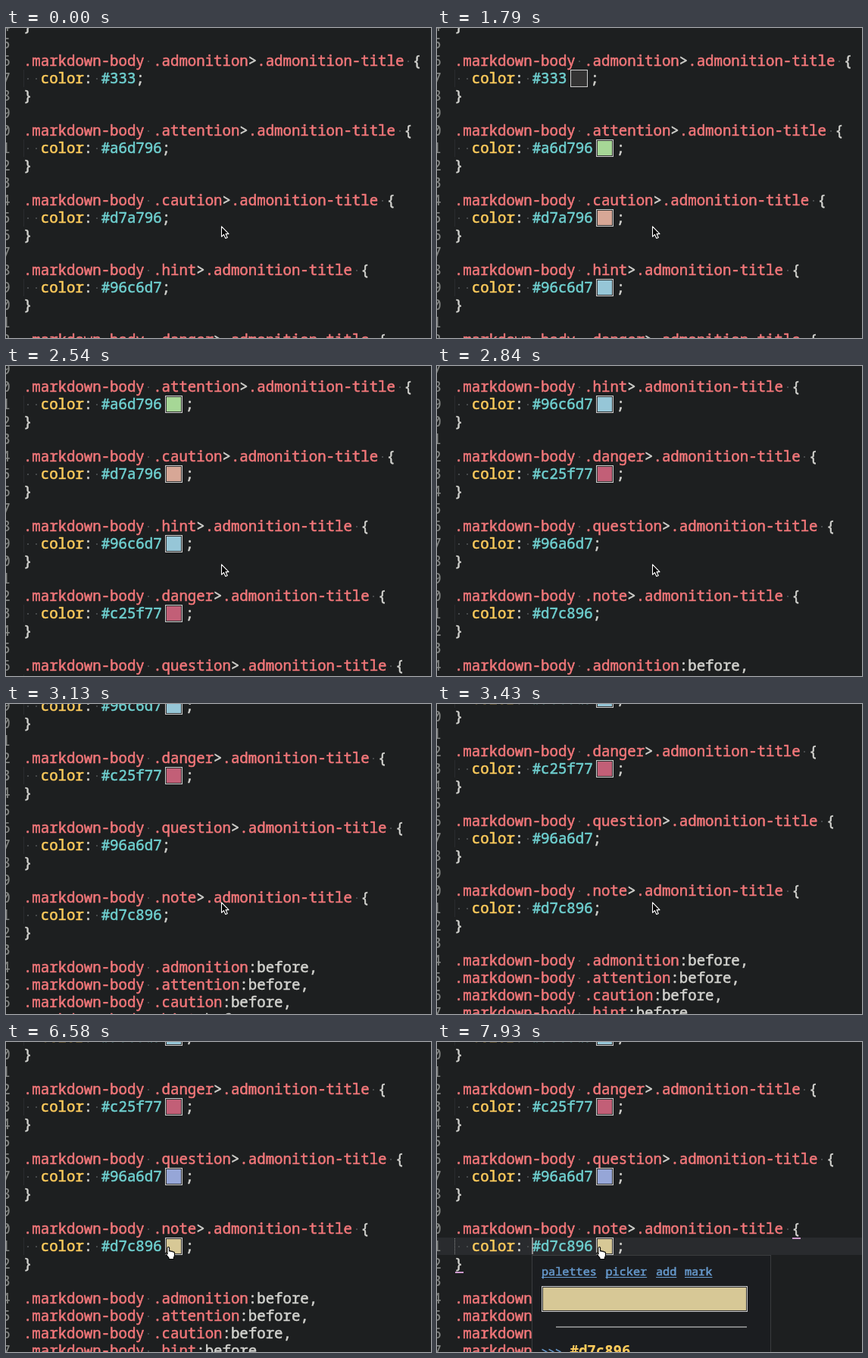
Animation, 561 px wide and 409 px high, one loop 8 s. Source, as an HTML page with a canvas:

```html
<!DOCTYPE html>
<html lang="en">
<head>
<meta charset="utf-8">
<title>Inline color swatches</title>
<style>
  html, body { margin: 0; width: 100%; height: 100%; overflow: hidden; background: #1d1f20; }
  canvas { display: block; }
</style>
</head>
<body>
<canvas id="stage" width="561" height="409"></canvas>
<script>
const ctx = document.getElementById('stage').getContext('2d');
const LOOP = 8000, LINE = 23, LEFT = 22.9, FIRST_BASELINE = 50;
const FONT = '"Noto Sans Mono", "DejaVu Sans Mono", monospace';
const CODE_FONT = `19.05px ${FONT}`, LINK_FONT = `15.2px ${FONT}`;
const RED = '#f2777a', YELLOW = '#ffcc5c', CYAN = '#6fd0d0', PLAIN = '#d2d2ce',
      BLUE = '#6699cc', PURPLE = '#cc99cc', BG = '#1d1f20';

// class name, color, time at which its swatch appears
const rules = [
  ['admonition', '#333', 150], ['attention', '#a6d796', 900],
  ['caution', '#d7a796', 1340], ['hint', '#96c6d7', 1790],
  ['danger', '#c25f77', 2240], ['question', '#96a6d7', 4480],
  ['note', '#d7c896', 5230]
];
const scrollSteps = [[0, 0], [2240, 10], [2390, 40], [2540, 108], [2690, 208], [2840, 292],
                     [2980, 325], [3130, 340], [3280, 347], [3430, 349]];
const pointerSteps = [[0, [284, 261, drawArrow]], [6130, [259, 261, drawArrow]],
                      [6280, [222, 263, drawHand]], [6430, [212, 269, drawHand]],
                      [6580, [210, 270, drawHand]]];
const caretSteps = [[0, 0], [7480, 1], [7780, 0.35], [7930, 0.6]];
const POPUP_TIME = 7480;

const stepAt = (steps, t) => steps.filter(([start]) => start <= t).pop()[1];

function rect(x, y, w, h, color) {
  ctx.fillStyle = color;
  ctx.fillRect(x, y, w, h);
}

// The thin stroke gives the medium weight of the editor font.
function text(str, x, y, color, stroke = 0.55) {
  ctx.fillStyle = ctx.strokeStyle = color;
  ctx.lineWidth = stroke;
  ctx.lineJoin = 'round';
  ctx.fillText(str, x, y);
  ctx.strokeText(str, x, y);
}

function colorBox(x, y, w, h, color) {
  rect(x, y, w, h, '#cccccc');
  rect(x + 1, y + 1, w - 2, h - 2, '#333333');
  rect(x + 2, y + 2, w - 4, h - 4, color);
}

// Draws [string, color] runs from the left margin, with a dot for every space.
function codeLine(y, runs) {
  const cell = ctx.measureText('0').width;
  let x = LEFT;
  for (const [str, color] of runs) {
    text(str, x, y, color);
    [...str].forEach((ch, i) => {
      if (ch === ' ') rect(Math.round(x + (i + 0.5) * cell - 1), y - 7, 2, 2, '#46494b');
    });
    x += str.length * cell;
  }
  return x;
}

function drawRule(y, [name, color, shownAt], t) {
  codeLine(y, [['.markdown-body .' + name, RED], ['>', PLAIN],
               ['.admonition-title', RED], [' {', PLAIN]]);
  y += LINE;
  rect(23, y - 18, 1, LINE, '#2a2c2e');
  const end = codeLine(y, [['  color', YELLOW], [': ', PLAIN], [color, CYAN]]);
  const shown = t >= shownAt;
  if (shown) colorBox(Math.round(end + 4.7), y - 18, 23, 23, color);
  text(';', end + (shown ? 31 : 0), y, PLAIN);
  text('}', LEFT, y + LINE, PLAIN);
}

function drawCode(t) {
  const baseline = row => FIRST_BASELINE + row * LINE - stepAt(scrollSteps, t);
  ctx.font = CODE_FONT;
  for (let row = -2; row < 33; row++) text((row + 16) % 10, -5.8, baseline(row), '#858785', 0.2);
  text('}', LEFT, baseline(-2), PLAIN);
  rules.forEach((rule, i) => drawRule(baseline(i * 4), rule, t));
  rules.slice(0, 4).forEach(([name], i) =>
    codeLine(baseline(28 + i), [['.markdown-body .' + name, RED], [':before,', PLAIN]]));
}

function drawPopup() {
  rect(125, 281, 316, 130, '#3a3c3e');
  rect(126, 282, 314, 130, '#1b1d20');
  ctx.font = LINK_FONT;
  const link = (label, x, y) => {
    text(label, x, y, BLUE);
    rect(x, y + 2, ctx.measureText(label).width, 1, BLUE);
  };
  link('palettes', 138, 308);
  link('picker', 222.5, 308);
  link('add', 289, 308);
  link('mark', 327, 308);
  colorBox(138, 322, 272, 34, '#d7c896');
  rect(157, 375, 252, 2, '#7f8081');
  link('>>>', 137.5, 414);
  ctx.font = 'bold ' + CODE_FONT;
  text('#d7c896', 175.5, 414, YELLOW, 0.1);
}

function drawSelection(t) {
  rect(469, 258, 11, 2, PURPLE);
  rect(24, 303, 11, 2, PURPLE);
  for (let y = 259; y < 281; y += 2) rect(23, y, 1, 1, '#8a8c8e');
  ctx.globalAlpha = stepAt(caretSteps, t);
  rect(125, 258, 2, 22, '#d8d0d0');
  ctx.globalAlpha = 1;
}

function paintShape(x, y, path, fill, outline) {
  ctx.save();
  ctx.translate(x, y);
  const shape = new Path2D(path);
  ctx.lineJoin = 'round';
  ctx.lineWidth = 1.1;
  ctx.fillStyle = fill;
  ctx.strokeStyle = outline;
  ctx.fill(shape);
  ctx.stroke(shape);
  ctx.restore();
}

function drawArrow(x, y) {
  paintShape(x, y, 'M.5 .8V14.3L3.5 11.5L5.8 16.5L8.2 15.4L6 10.6H10Z', '#000', '#fff');
}

function drawHand(x, y) {
  paintShape(x, y, 'M3 10V2Q3 .5 4.3 .5T5.6 2V6Q6.9 5 8 6.4Q9.3 5.6 10.3 7Q12.5 6.5 12.5 8.8' +
    'V11Q12.5 13 11.3 14.5V16.5H5V14.8L1 10.2Q0 8.4 1.2 8.1Q2 8 3 10Z', '#fff', '#000');
}

function draw(now) {
  const t = now % LOOP, popup = t >= POPUP_TIME;
  rect(0, 0, 561, 409, BG);
  if (popup) rect(0, 258, 561, LINE, '#292b2e');
  drawCode(t);
  if (popup) {
    drawSelection(t);
    drawPopup();
  }
  const [x, y, drawPointer] = stepAt(pointerSteps, t);
  drawPointer(x, y);
}

const start = performance.now();
function tick() {
  draw(performance.now() - start);
  requestAnimationFrame(tick);
}
tick();
</script>
</body>
</html>
```
